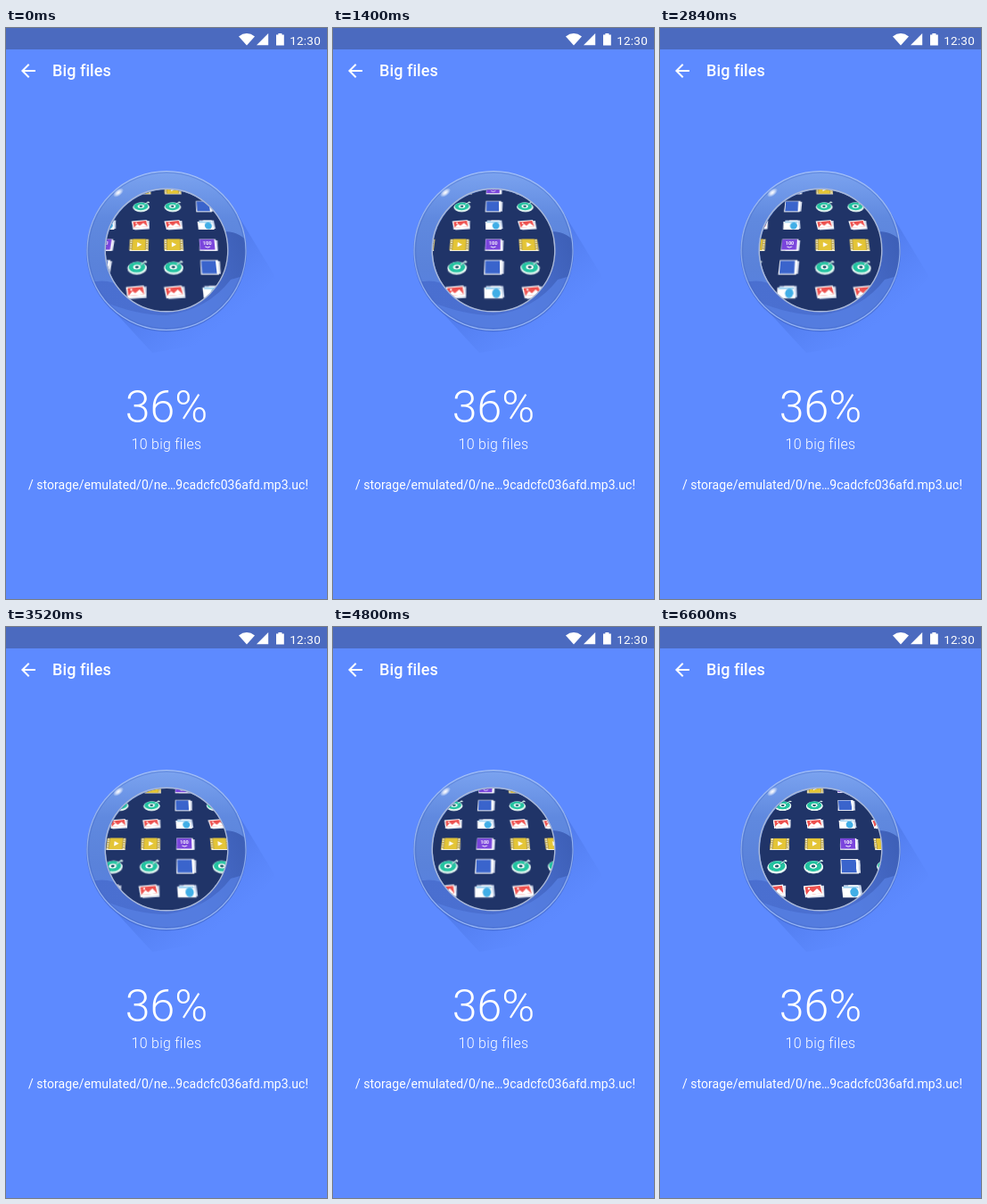
An HTML page for the animation above (6640 ms loop, 360 px wide and 640 px high).

```html
<!DOCTYPE html>
<html lang="en">
<head>
<meta charset="utf-8">
<title>Big files</title>
<style>
  html, body { margin: 0; width: 100%; height: 100%; overflow: hidden; background: #5d8aff; }
  .stage { position: relative; width: 360px; height: 640px; overflow: hidden; }
  .layer { position: absolute; left: 0; top: 0; }
  text { font-family: Roboto, "Noto Sans", sans-serif; fill: #fff; }
  .window {
    position: absolute; left: 111.5px; top: 180.5px; width: 137px; height: 137px;
    border-radius: 50%; overflow: hidden; background: #203468;
  }
  /* Tilted plane of icons; its origin is the middle row */
  .plane {
    position: absolute; left: -21.5px; top: -22.5px;
    transform-origin: 90px 85px;
    animation: slide 6640ms cubic-bezier(.3333, 0, .6667, 1) infinite;
  }
  @keyframes slide {
    from { transform: perspective(84px) rotateX(10deg) translateX(0); }
    to { transform: perspective(84px) rotateX(10deg) translateX(-403px); }
  }
</style>
</head>
<body>
<div class="stage">

  <svg class="layer" width="360" height="640" viewBox="0 0 360 640">
    <defs>
      <linearGradient id="cast" gradientUnits="userSpaceOnUse" x1="180" y1="249" x2="244" y2="332">
        <stop offset=".3" stop-color="#3f66cf" stop-opacity=".38"/>
        <stop offset="1" stop-color="#4a74e4" stop-opacity="0"/>
      </linearGradient>
      <linearGradient id="ring" x1="0" y1="0" x2="0" y2="1">
        <stop offset="0" stop-color="#7ba3f0"/>
        <stop offset=".3" stop-color="#6089df"/>
        <stop offset=".6" stop-color="#5a82da"/>
        <stop offset="1" stop-color="#5580e6"/>
      </linearGradient>
      <linearGradient id="wave" gradientUnits="userSpaceOnUse" x1="100" y1="310" x2="268" y2="250">
        <stop offset="0" stop-color="#4a6fd0"/>
        <stop offset=".6" stop-color="#4b70d2"/>
        <stop offset="1" stop-color="#3e60b8"/>
      </linearGradient>
      <linearGradient id="rim" x1="0" y1="0" x2="0" y2="1">
        <stop offset="0" stop-color="#a9c4f8"/>
        <stop offset=".6" stop-color="#8aa9ea"/>
        <stop offset="1" stop-color="#9dbaf6"/>
      </linearGradient>
      <radialGradient id="glint">
        <stop offset="0" stop-color="#fff"/>
        <stop offset=".4" stop-color="#fff" stop-opacity=".7"/>
        <stop offset="1" stop-color="#fff" stop-opacity="0"/>
      </radialGradient>
      <clipPath id="disk"><circle cx="180" cy="249.5" r="89"/></clipPath>
    </defs>

    <rect width="360" height="24" fill="#4b6abf"/>
    <g fill="#fff">
      <path d="M261 9.4Q270 2.8 279 9.4L270 19.4Z"/>
      <path d="M281 19.2L294.2 6V19.2Z"/>
      <path d="M303 7.6h2.4V6h4v1.6h2.4v11.8H303Z"/>
      <path d="M33 47H20.83l5.59-5.59L25 40l-8 8 8 8 1.41-1.41L20.83 49H33Z"/>
    </g>
    <text x="318.3" y="18.5" font-size="13.5" letter-spacing=".2">12:30</text>
    <text x="52" y="54" font-size="18" font-weight="500" letter-spacing=".08">Big files</text>

    <path d="M258 206L302 279L236 352L164 364L118 314Z" fill="url(#cast)"/>
    <circle cx="180" cy="250.5" r="90" fill="#4267c6" opacity=".6"/>
    <circle cx="180" cy="249.5" r="89" fill="url(#ring)"/>
    <g clip-path="url(#disk)">
      <path d="M90 287Q112 278 134 292T200 290T246 228Q260 228 272 240V345H90Z" fill="url(#wave)"/>
      <path d="M108 306Q146 322 180 322Q226 316 252 282L272 276V345H108Z" fill="#5781e4" opacity=".75"/>
    </g>
    <circle cx="180" cy="249.5" r="87.400" fill="none" stroke="#4467bd" stroke-opacity=".4"/>
    <circle cx="180" cy="249.5" r="89" fill="none" stroke="url(#rim)" stroke-width="1.2"/>
    <ellipse cx="126" cy="184.500" rx="7" ry="3.8" fill="url(#glint)" transform="rotate(-38 126 184.5)"/>

    <text x="180" y="442" font-size="50" font-weight="300" text-anchor="middle">36%</text>
    <text x="180" y="472" font-size="16" font-weight="300" letter-spacing=".25" text-anchor="middle">10 big files</text>
    <text x="25" y="517" font-size="14" letter-spacing=".04">/ storage/emulated/0/ne…9cadcfc036afd.mp3.uc!</text>
  </svg>

  <div class="window">
    <svg class="plane" width="620" height="170" viewBox="-90 -85 620 170">
      <defs>
        <g id="film">
          <path d="M-10.500-6H10.500L11 7H-10Z" fill="#f4f1dc"/>
          <path d="M-10.500-6.500H10.500V6H-10.500Z" fill="#b9a24a"/>
          <path d="M-7-6.500H7V6H-7Z" fill="#e4c536"/>
          <path d="M-8.900-6V6M8.900-6V6" stroke="#f3eed2" stroke-width="1.800" stroke-dasharray="1.500 1.100"/>
          <path d="M-2-3L3.200-.2L-2 2.600Z" fill="#fff"/>
        </g>
        <g id="disc">
          <ellipse cx="-.3" cy="1" rx="10.300" ry="6.600" fill="#e4f6f2"/>
          <ellipse cx="-.6" cy="0" rx="8.800" ry="5.400" fill="#22c3a0"/>
          <ellipse cx="-.6" cy="0" rx="4" ry="2.500" fill="#fff"/>
          <ellipse cx="-.6" cy="0" rx="2" ry="1.300" fill="#1f5a6b"/>
          <path d="M3.500-2L8-5.800L9.500-4.800" fill="none" stroke="#e4f6f2" stroke-width="1.500"/>
          <path d="M3.500-1.500L7.500-4.800" fill="none" stroke="#1b8f86" stroke-width=".8"/>
        </g>
        <g id="photo">
          <path d="M-7-4L10.500-5L11 5.500L-6 6.500Z" fill="#d3daea"/>
          <path d="M-10.500-4.500L7.500-6L10.500 4L-8 6Z" fill="#fff"/>
          <path d="M-8.800-3.500L6.700-4.800L8.600 2.300L-7.200 3.800Z" fill="#ee514f"/>
          <path d="M-7.200 3.800L-3.500-.8L-.5 1.300L3.500-2.200L8.600 2.300Z" fill="#fff"/>
          <circle cx="-4.800" cy="-2" r="1" fill="#fff"/>
        </g>
        <g id="score">
          <path d="M-5-6L11-5L10.300 6.800H-5Z" fill="#cfd5ea"/>
          <path d="M-9.500-6.500H9V6.800H-10Z" fill="#fff"/>
          <path d="M-9.300-6.200H7.500L7.200 5.600H-9.500Z" fill="#7a45dc"/>
          <text x="-.8" y="0" font-size="5.600" font-weight="700" text-anchor="middle">100</text>
          <path d="M-3.500 2Q-.8 4.200 2 2" fill="none" stroke="#fff"/>
        </g>
        <g id="app">
          <path d="M-4-6.800L11-6L10.300 7H-4Z" fill="#d3daea"/>
          <path d="M-10-7.300H9L8.300 7.600H-10.500Z" fill="#fff"/>
          <rect x="-9.300" y="-6.600" width="15.600" height="13.200" fill="#3a64cc"/>
        </g>
        <g id="folder">
          <path d="M-8-5.500H9.500L10.500 5H-8Z" fill="#c5d3ea"/>
          <path d="M-10-4H-4L-3-5.500H7L9 6H-9.500Z" fill="#fff"/>
          <path d="M-8.500-4.200H6.500L7-2.500H-8.700Z" fill="#9fd3f2"/>
          <circle cx="2.400" cy="1.300" r="4.200" fill="#41aee6"/>
        </g>

        <g id="mediaSet">
          <use href="#film"/><use href="#disc" y="24.1"/><use href="#photo" y="48.2"/>
        </g>
        <g id="appSet">
          <use href="#score"/><use href="#app" y="24.1"/><use href="#folder" y="48.2"/>
        </g>
        <g id="media"><use href="#mediaSet" y="-72.3"/><use href="#mediaSet"/></g>
        <g id="apps"><use href="#appSet" y="-72.3"/><use href="#appSet"/></g>
        <g id="block">
          <use href="#apps"/>
          <use href="#media" x="38.8"/>
          <use href="#media" x="77.6"/>
          <use href="#apps" x="116.4"/>
          <use href="#media" x="155.2"/>
        </g>
      </defs>
      <g transform="translate(-69.7 0)">
        <use href="#block"/>
        <use href="#block" x="194"/>
        <use href="#block" x="388"/>
      </g>
    </svg>
  </div>

  <svg class="layer" width="360" height="640" viewBox="0 0 360 640">
    <circle cx="180" cy="249" r="68.8" fill="none" stroke="#a9b8d8" stroke-width="1.4"/>
  </svg>
</div>
</body>
</html>
```
